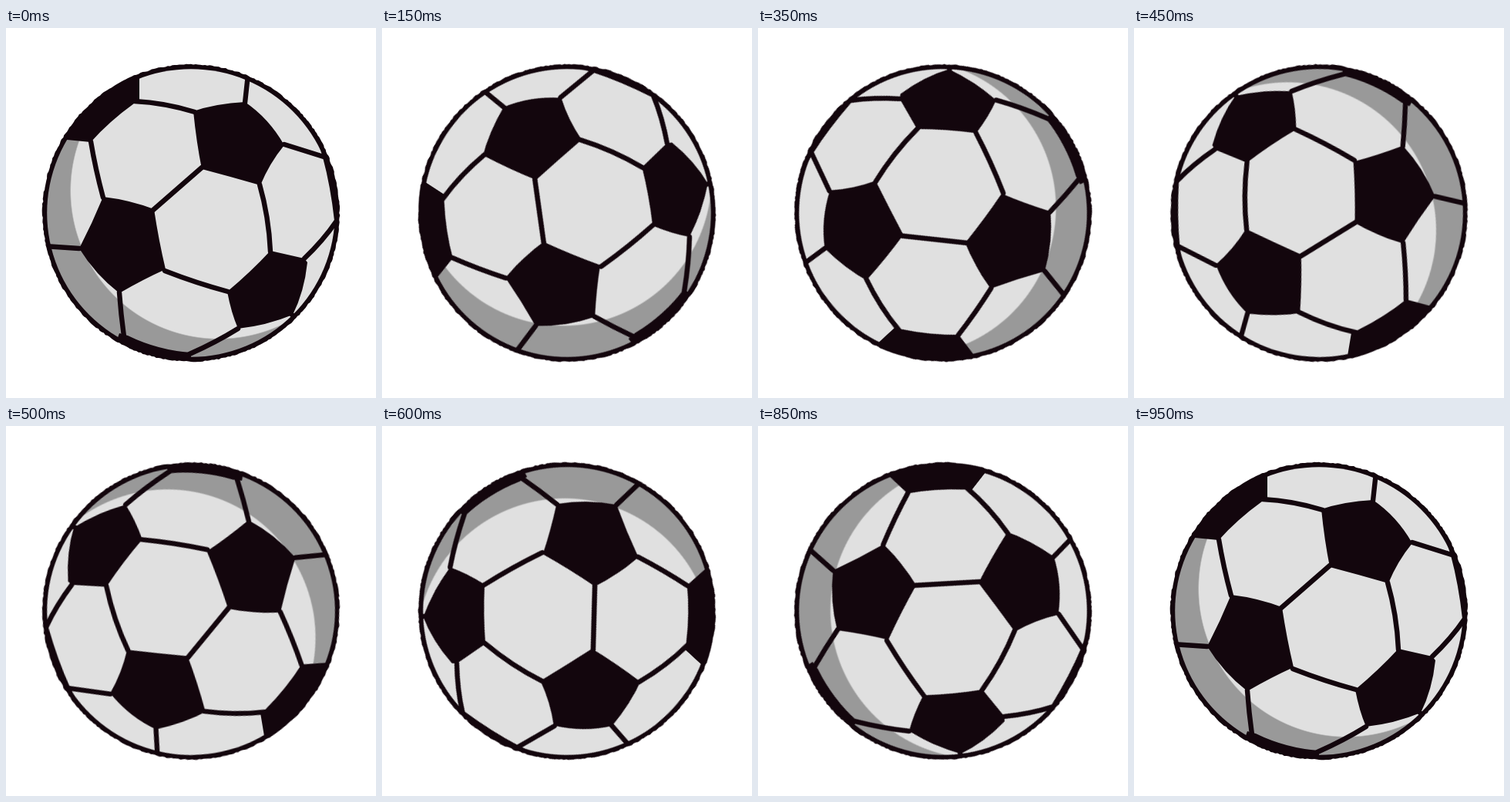
An HTML page that plays this animation: 480 px wide and 480 px high, repeating every 1 s.

```html
<!DOCTYPE html>
<html lang="en">
<head>
<meta charset="utf-8">
<title>Rolling ball</title>
<style>
  html, body { margin: 0; width: 100%; height: 100%; overflow: hidden; background: #fff; }
  svg { display: block; width: 100%; height: 100%; }
  #ball { transform-origin: 240px 240px; fill: #13060d; }
  #seams { fill: none; stroke: #13060d; stroke-width: 6.4; stroke-linecap: round; }
</style>
</head>
<body>
<svg viewBox="0 0 480 480">
  <defs>
    <radialGradient id="shade" gradientUnits="userSpaceOnUse" cx="276" cy="211" r="193">
      <stop offset=".992" stop-color="#e0e0e0"/>
      <stop offset="1" stop-color="#999"/>
    </radialGradient>
    <clipPath id="inside"><circle cx="240" cy="240" r="190"/></clipPath>
  </defs>
  <g id="ball">
    <path id="disk"/>
    <circle cx="240" cy="240" r="186.8" fill="url(#shade)"/>
    <g clip-path="url(#inside)">
      <!-- whole pentagons -->
      <path d="M243 108Q272 98 310 96Q341 117 361 152Q342 175 330 204Q292 193 254 183Q247 148 243 108Z"/>
      <path d="M126 219Q160 223 192 235Q198 275 207 313Q178 326 147 344Q116 320 95 286Q112 253 126 219Z"/>
      <path d="M343 289L387 299L391 304Q387 342 372 372Q338 386 301 390Q292 369 287 342Q317 317 343 289Z"/>
      <!-- pentagons cut by the rim -->
      <path d="M173 40V93L166 98Q134 121 110 148L79 145L40 130Z"/>
      <path d="M407 155L411 168Q421 205 426 250H445V155Z"/>
      <path d="M147 396L158 399Q197 418 240 421V445H130Z"/>
      <path id="seams" d="M254 181Q223 208 191 236M329 203Q341 245 343 290M206 315Q247 331 288 342
        M167 95Q206 97 245 109M310 97L314 60M361 151L412 167M387 299Q412 275 429 250
        M371 372L382 380M301 390Q272 408 238 423M147 343Q149 371 153 400
        M95 286L50 283M126 220Q116 183 110 147"/>
    </g>
  </g>
</svg>
<script>
  // Hand-drawn rim: a circle with slight seeded roughness.
  let seed = 7;
  const rand = () => (seed = seed * 16807 % 2147483647) / 2147483647;
  const count = 400;
  const rim = Array.from({ length: count }, (_, i) => {
    const angle = i / count * 2 * Math.PI;
    const radius = 192.8 + (rand() - .5) * 1.2;
    return (240 + radius * Math.cos(angle)).toFixed(1) + ' ' +
           (240 + radius * Math.sin(angle)).toFixed(1);
  });
  document.getElementById('disk').setAttribute('d', 'M' + rim.join('L') + 'Z');

  // 20 poses per loop; a full turn takes 19, so the last pose equals the first.
  const turn = -360 / 19 * 20;
  document.getElementById('ball').animate(
    [{ transform: 'rotate(0deg)' }, { transform: `rotate(${turn}deg)` }],
    { duration: 1000, iterations: Infinity, easing: 'steps(20, end)' }
  );
</script>
</body>
</html>
```
